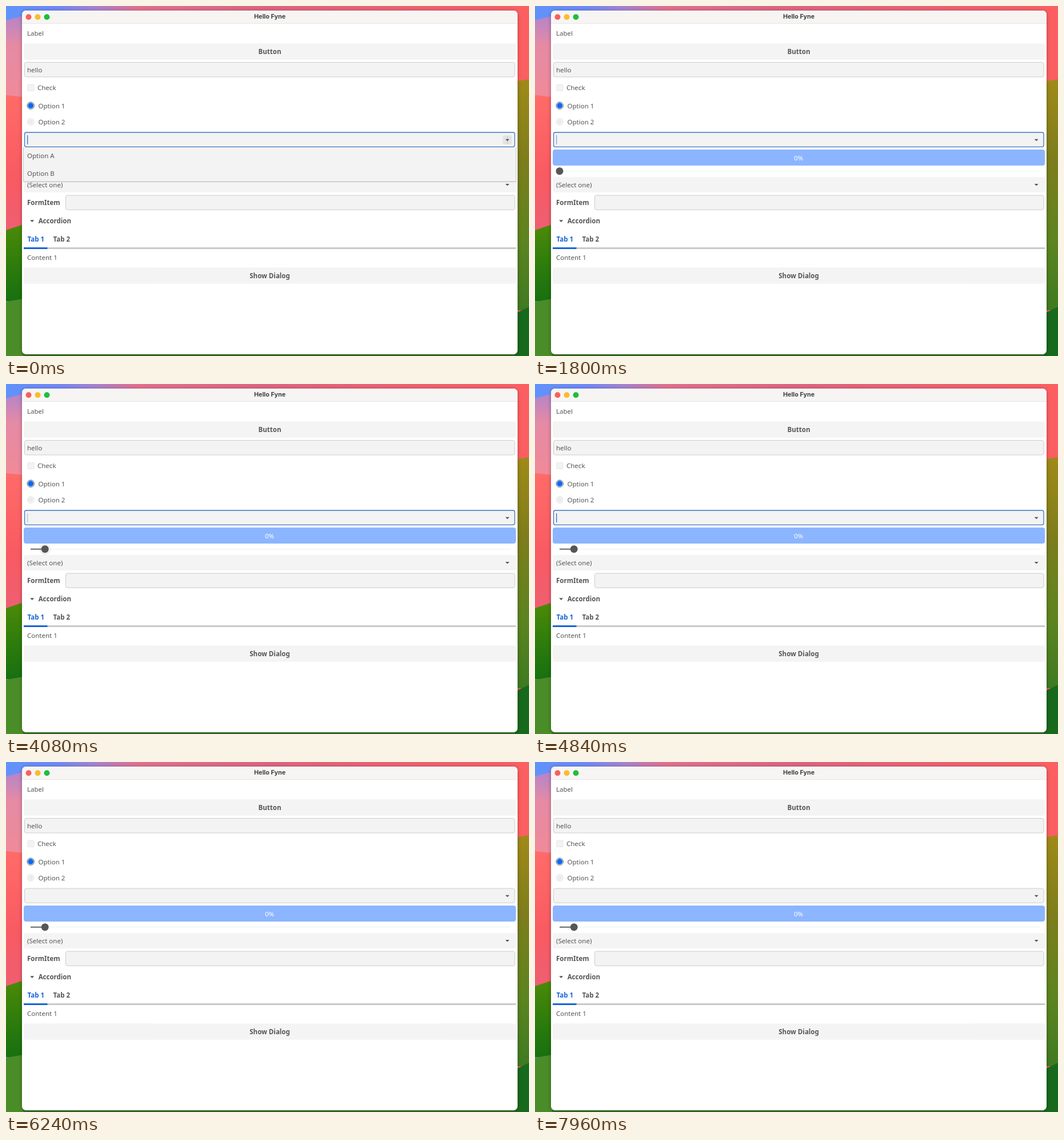
Recreate the animation shown at these times as an HTML page. Size 915 by 612 pixels, loop 8 s.

```html
<!DOCTYPE html>
<html lang="en">
<head>
<meta charset="utf-8">
<title>Hello Fyne</title>
<style>
  html, body { margin: 0; width: 100%; height: 100%; overflow: hidden; }
  svg { display: block; }
  text { font: 11.5px "Noto Sans", sans-serif; fill: #565656; }
  .b { font-weight: 700; }
  .mid { text-anchor: middle; }
  .title { font: 700 10.8px Inter, sans-serif; fill: #404040; }
  .btn { fill: #f4f4f4; }
  .input { fill: #f3f3f3; stroke: #cccccc; }
  .off { fill: #f3f3f3; stroke: #e6e6e6; }
  .dark { fill: #565656; }
  .blue { fill: #1764d8; }
</style>
</head>
<body>
<svg width="915" height="612" viewBox="0 0 915 612">
  <defs>
    <linearGradient id="top">
      <stop offset="0" stop-color="#5f93fb"/><stop offset=".1" stop-color="#7288f5"/>
      <stop offset=".17" stop-color="#a583cf"/><stop offset=".25" stop-color="#e0708e"/>
      <stop offset=".5" stop-color="#dd6580"/><stop offset="1" stop-color="#f95f63"/>
    </linearGradient>
    <linearGradient id="pink" x2="0" y2="1">
      <stop offset="0" stop-color="#b385c8"/><stop offset=".35" stop-color="#e58aa5"/><stop offset="1" stop-color="#f08a98"/>
    </linearGradient>
    <linearGradient id="red" x2="0" y2="1">
      <stop offset="0" stop-color="#ff6b68"/><stop offset=".6" stop-color="#f95a62"/><stop offset="1" stop-color="#ee5f72"/>
    </linearGradient>
    <linearGradient id="green" x2="0" y2="1">
      <stop offset="0" stop-color="#4c8a08"/><stop offset=".5" stop-color="#2f7d0c"/><stop offset="1" stop-color="#17700f"/>
    </linearGradient>
    <linearGradient id="olive" x2="0" y2="1">
      <stop offset="0" stop-color="#a08a18"/><stop offset=".35" stop-color="#7d7d1c"/>
      <stop offset=".7" stop-color="#5c8420"/><stop offset="1" stop-color="#3f7a22"/>
    </linearGradient>
    <filter id="soft" x="-5%" y="-5%" width="110%" height="110%"><feGaussianBlur stdDeviation="3"/></filter>
  </defs>

  <!-- wallpaper -->
  <rect width="915" height="612" fill="url(#top)"/>
  <path d="M0 25L30 17V162L0 156Z" fill="url(#pink)"/>
  <path d="M0 156L30 159V385L0 392Z" fill="url(#red)"/>
  <path d="M0 392L30 382V516H0Z" fill="url(#green)"/>
  <path d="M0 517L30 512V612H0Z" fill="#4a8c28"/>
  <path d="M890 0H915V134H890Z" fill="#fb5f61"/>
  <path d="M890 132L915 128V532H890Z" fill="url(#olive)"/>
  <path d="M890 538L915 526V612H890Z" fill="#176a1c"/>
  <path d="M30 607H890V612H30Z" fill="#397326"/>

  <!-- window -->
  <rect x="28" y="9" width="867" height="601" rx="7" opacity=".3" filter="url(#soft)"/>
  <rect x="28" y="8" width="867" height="601" rx="7" fill="#fff"/>
  <path d="M28 30.5V15a7 7 0 0 1 7-7H888a7 7 0 0 1 7 7V30.5Z" fill="#f6f5f4"/>
  <path d="M28 30.5H895" stroke="#e7e6e5"/>
  <circle cx="39.5" cy="19.3" r="5" fill="#f9605a"/>
  <circle cx="55.5" cy="19.3" r="5" fill="#fbbb2e"/>
  <circle cx="71.5" cy="19.3" r="5" fill="#20bd3c"/>
  <text class="title mid" x="461.5" y="22.3">Hello Fyne</text>

  <text x="37" y="52.3">Label</text>
  <rect class="btn" x="31" y="65.5" width="861" height="28.5" rx="4"/>
  <text class="b mid" x="461.5" y="84">Button</text>
  <rect class="input" x="32.5" y="98.5" width="857.5" height="25.5" rx="3"/>
  <text x="37" y="115.7">hello</text>
  <rect class="off" x="38" y="137.5" width="11" height="11" rx="1"/>
  <text x="55" y="147.2">Check</text>
  <circle cx="43.2" cy="174.2" r="6.2" fill="#fff" stroke="#565656"/>
  <circle cx="43.2" cy="174.2" r="4.9" fill="#0c69f5"/>
  <text x="56.5" y="178.5">Option 1</text>
  <circle class="off" cx="43.2" cy="202.4" r="6"/>
  <circle cx="43.2" cy="202.4" r="3.5" fill="#ebebeb"/>
  <text x="56.5" y="206.9">Option 2</text>

  <rect id="entry" class="input" x="32.5" y="221" width="857.5" height="25.3" rx="3"/>
  <rect id="caret" x="37" y="226" width="1.3" height="16" fill="#2f6fd0"/>
  <g id="hover">
    <rect x="869" y="226" width="16" height="16" rx="3" fill="#e4e4e4"/>
    <path d="M877.3 228V241" stroke="#bdbdbd"/>
  </g>
  <path class="dark" d="M873.7 232.7h7l-3.5 3.6z"/>

  <rect x="31" y="251" width="861" height="28" rx="4" fill="#8cb5ff"/>
  <text class="mid" x="461" y="269.6" style="fill:#fff">0%</text>

  <rect x="43" y="288" width="840" height="1.4" fill="#f3f3f3"/>
  <circle id="halo" cy="288.7" r="10" fill="#efefef"/>
  <rect id="fill" x="43" y="287.8" height="1.8" class="dark"/>
  <circle id="knob" cy="288.7" r="6.5" class="dark"/>

  <rect class="btn" x="31" y="299" width="861" height="27" rx="4"/>
  <text x="37" y="317.2">(Select one)</text>
  <path class="dark" d="M873.7 311h7l-3.5 3.6z"/>
  <text class="b" x="37" y="348.2">FormItem</text>
  <rect class="input" x="104.5" y="331" width="785.5" height="25.3" rx="3"/>
  <path class="dark" d="M42.2 374.3h7l-3.5 3.6z"/>
  <text class="b" x="56.7" y="380.2">Accordion</text>
  <text class="b blue" x="37.5" y="412.2" style="fill:#1764d8">Tab 1</text>
  <text class="b" x="82.5" y="412.2">Tab 2</text>
  <rect x="31" y="422" width="861" height="3" fill="#c9c9c9"/>
  <rect class="blue" x="31" y="422" width="41.5" height="3"/>
  <text x="37" y="444">Content 1</text>
  <rect class="btn" x="31" y="457.3" width="861" height="28.5" rx="4"/>
  <text class="b mid" x="461.5" y="475.6">Show Dialog</text>

  <g id="menu">
    <rect x="30" y="248" width="863" height="60" opacity=".35" filter="url(#soft)" clip-path="inset(0)"/>
    <path d="M30.5 247H892.5V307H30.5Z" fill="#f3f3f3"/>
    <path d="M30.5 247V307H892.5V247" fill="none" stroke="#c6c6c6"/>
    <text x="37" y="265.7">Option A</text>
    <text x="37" y="297">Option B</text>
  </g>
</svg>
<script>
  const LOOP = 8000, MENU_CLOSE = 400, BLUR = 5700, BLINK = 1100;
  const STEPS = [3160, 3560, 4000];   // times the slider moves up by one
  const $ = id => document.getElementById(id);
  const show = (id, on) => $(id).setAttribute("visibility", on ? "visible" : "hidden");

  function draw(t) {
    const open = t < MENU_CLOSE, focused = t < BLUR;
    show("menu", open);
    show("hover", open);
    $("entry").style.stroke = focused ? "#3f74c4" : "#cccccc";
    $("entry").style.strokeWidth = focused ? 1.3 : 1;

    const wave = .5 + .5 * Math.cos(2 * Math.PI * (t - 460) / BLINK);
    show("caret", focused);
    $("caret").setAttribute("opacity", open ? 1 : wave);

    const x = 43 + 8.4 * STEPS.filter(s => t >= s).length;
    show("halo", t >= 2900 && t < 4400);
    $("halo").setAttribute("cx", x);
    $("knob").setAttribute("cx", x);
    $("fill").setAttribute("width", x - 43);
  }

  const start = performance.now();
  function tick() {
    draw((performance.now() - start) % LOOP);
    requestAnimationFrame(tick);
  }
  tick();
</script>
</body>
</html>
```
